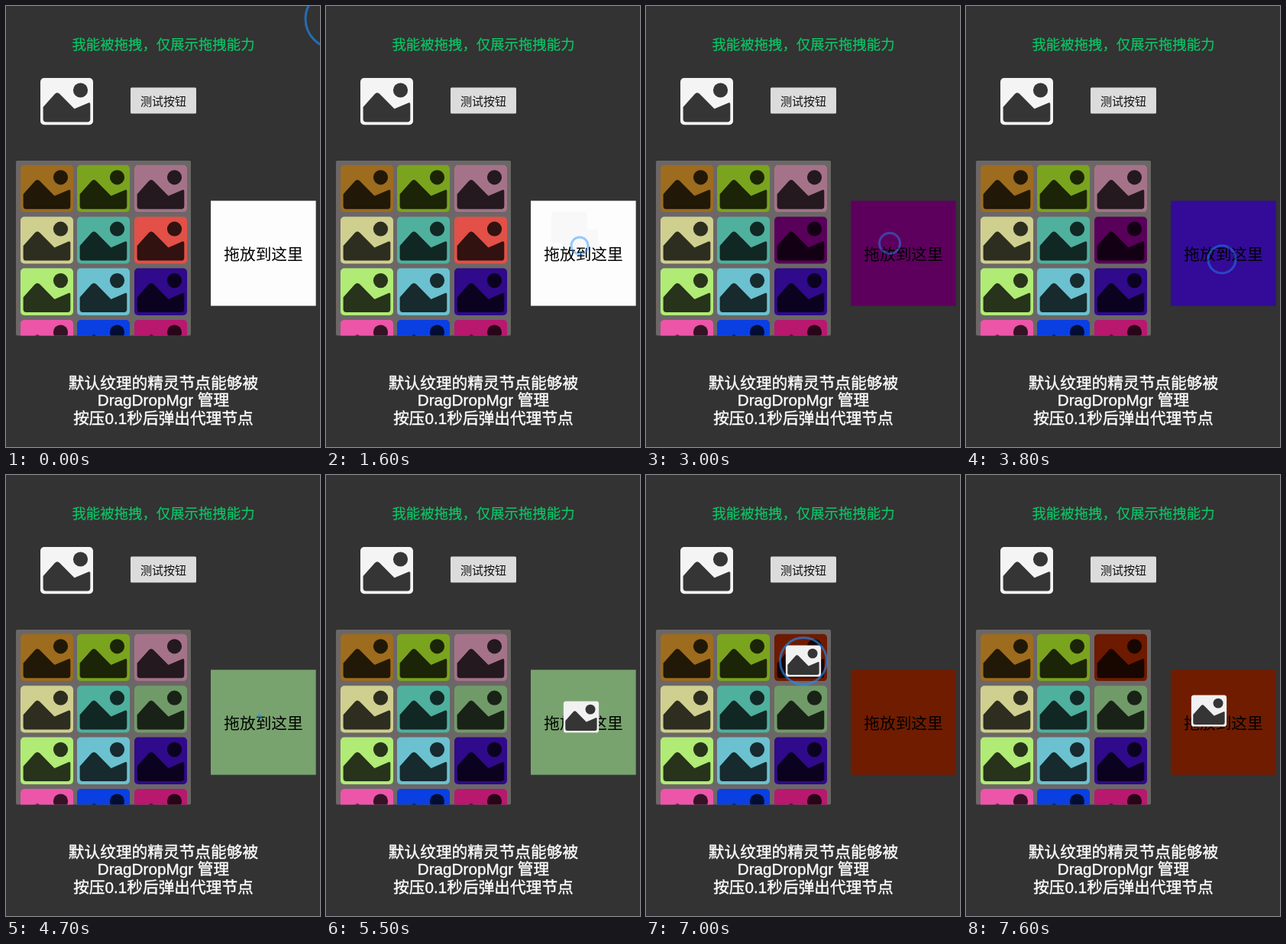
Animation of 411 by 576 pixels, one loop 8000 ms. Source, as an HTML page:

```html
<!DOCTYPE html>
<html lang="zh-CN">
<head>
<meta charset="utf-8">
<title>拖拽演示</title>
<style>
  html, body { margin: 0; width: 100%; height: 100%; overflow: hidden; background: #333; }
  svg { display: block; width: 411px; height: 576px; }
  text {
    font-family: "Liberation Sans", "Noto Sans CJK SC", "Noto Sans CJK", sans-serif;
    text-anchor: middle;
  }
  .label { font-size: 20.7px; }
</style>
</head>
<body>
<svg viewBox="0 0 411 576">
  <defs>
    <g id="card">
      <rect width="69" height="61.3" rx="5"/>
      <g fill="#000" fill-opacity=".78">
        <circle cx="52.5" cy="16" r="9.6"/>
        <path d="M3.6 38 L18.8 21 Q22 17.6 25.4 21 L44.5 40.3 L63 32.4 Q65.3 31.6 65.3 34 V53.5 Q65.3 57.4 61.5 57.4 H7.5 Q3.6 57.4 3.6 53.5 Z"/>
      </g>
    </g>
    <clipPath id="view"><rect x="13" y="202" width="229" height="228.6"/></clipPath>
  </defs>
  <rect width="411" height="576" fill="#333"/>
  <text x="206" y="57" font-size="18.4" fill="#0bc765" stroke="#0bc765" stroke-width=".2">我能被拖拽，仅展示拖拽能力</text>
  <use href="#card" x="45" y="94" fill="#f4f4f4"/>
  <rect x="163" y="106.4" width="86" height="34.2" rx="1.5" fill="#dcdcdc"/>
  <text x="206" y="130" font-size="15" fill="#111">测试按钮</text>
  <rect x="13" y="202" width="229" height="228.6" rx="2" fill="#6c6767"/>
  <g id="grid" clip-path="url(#view)"></g>
  <rect id="drop" x="268" y="254.4" width="137.6" height="137.2"/>
  <g id="trail" fill="#f8f8f8">
    <rect x="295" y="269" width="47" height="41" rx="3"/>
    <rect x="309" y="292" width="47" height="40" rx="3"/>
  </g>
  <text class="label" x="337" y="332" fill="#000">拖放到这里</text>
  <g class="label" fill="#fff" stroke="#fff" stroke-width=".4">
    <text x="206" y="500">默认纹理的精灵节点能够被</text>
    <text x="206" y="521.9">DragDropMgr 管理</text>
    <text x="206" y="546">按压0.1秒后弹出代理节点</text>
  </g>
  <use id="proxy" href="#card" fill="#f1f1f1"/>
  <g id="rings" fill="none" stroke="#1e90ff" stroke-width="3"></g>
</svg>
<script>
const LOOP = 8000, STEP = 100, SPEED = 0.145, SCALE = 0.67;
const $ = id => document.getElementById(id);

function add(parent, tag, attrs) {
  const el = document.createElementNS("http://www.w3.org/2000/svg", tag);
  set(el, attrs);
  return parent.appendChild(el);
}
function set(el, attrs) {
  for (const key in attrs) el.setAttribute(key, attrs[key]);
}

const colors = [
  "#9d6c1e", "#7aa41e", "#a57389",
  "#cfcf90", "#4fb09e", "#e25048",
  "#b0eb75", "#6bc1cf", "#2f0a8a",
  "#ec55a8", "#0a3fe2", "#b8186e"
];
const cells = colors.map((fill, i) => add($("grid"), "use", {
  href: "#card", fill,
  x: [19, 93, 168][i % 3],
  y: 207.8 + Math.floor(i / 3) * 67.4
}));

// Each drag: press time, move start, move end, release time, from, to
const drags = [
  [930, 1120, 1480, 1524, [70, 130], [332, 313]],
  [1930, 2560, 2920, 2907, [196, 300], [319, 310]],
  [3030, 3300, 3650, 3676, [218, 361], [335, 331]],
  [3930, 4200, 4650, 4690, [189, 303], [332, 315]],
  [4830, 5100, 5480, 5570, [123, 313], [334, 316]],
  [5975, 6430, 6620, 6640, [206, 244.5], [332, 316]],
  [6790, 7310, 7590, LOOP, [206, 243], [318, 308]]
];

// Ripples: start time, lifetime, centre, strength
const ripples = [[-262, 440, [430, 17], 0.62]];
for (const [press, , , release, from, to] of drags) {
  ripples.push([press, 480, from, 0.62], [release, 270, to, 0.45]);
}
const rings = ripples.map(([, , [cx, cy]]) => add($("rings"), "circle", { cx, cy }));

// Hard colour changes: element and [time, colour] steps
const paints = [
  [cells[2], [[0, colors[2]], [5975, "#6d1a00"]]],
  [cells[5], [[0, colors[5]], [1930, "#59005a"], [3930, "#719a69"]]],
  [$("drop"), [[0, "#fdfdfd"], [2907, "#5d005d"], [3676, "#330b98"],
    [4690, "#78a36f"], [5570, "#54bca8"], [6640, "#701c00"]]]
];

function show(el, on) {
  el.style.visibility = on ? "visible" : "hidden";
}

function draw(t) {
  for (const [el, steps] of paints) {
    set(el, { fill: steps.filter(s => s[0] <= t).pop()[1] });
  }
  show($("trail"), t >= 1500 && t < 2907);

  const drag = drags.find(d => t >= d[0] + 150 && t < d[3]);
  show($("proxy"), drag);
  if (drag) {
    const [, start, end, , from, to] = drag;
    const p = Math.min(1, Math.max(0, (t - start) / (end - start)));
    const x = from[0] + (to[0] - from[0]) * p - 34.5 * SCALE;
    const y = from[1] + (to[1] - from[1]) * p - 30.7 * SCALE;
    set($("proxy"), { transform: `translate(${x} ${y}) scale(${SCALE})` });
  }

  ripples.forEach(([start, life, , strength], i) => {
    const age = t - start, on = age > 0 && age < life;
    show(rings[i], on);
    if (on) set(rings[i], { r: age * SPEED, opacity: strength * Math.min(1, (500 - age) / 230) });
  });
}

const begin = performance.now();
function tick() {
  const t = (performance.now() - begin) % LOOP;
  draw(Math.floor(t / STEP) * STEP);
  requestAnimationFrame(tick);
}
tick();
</script>
</body>
</html>
```
